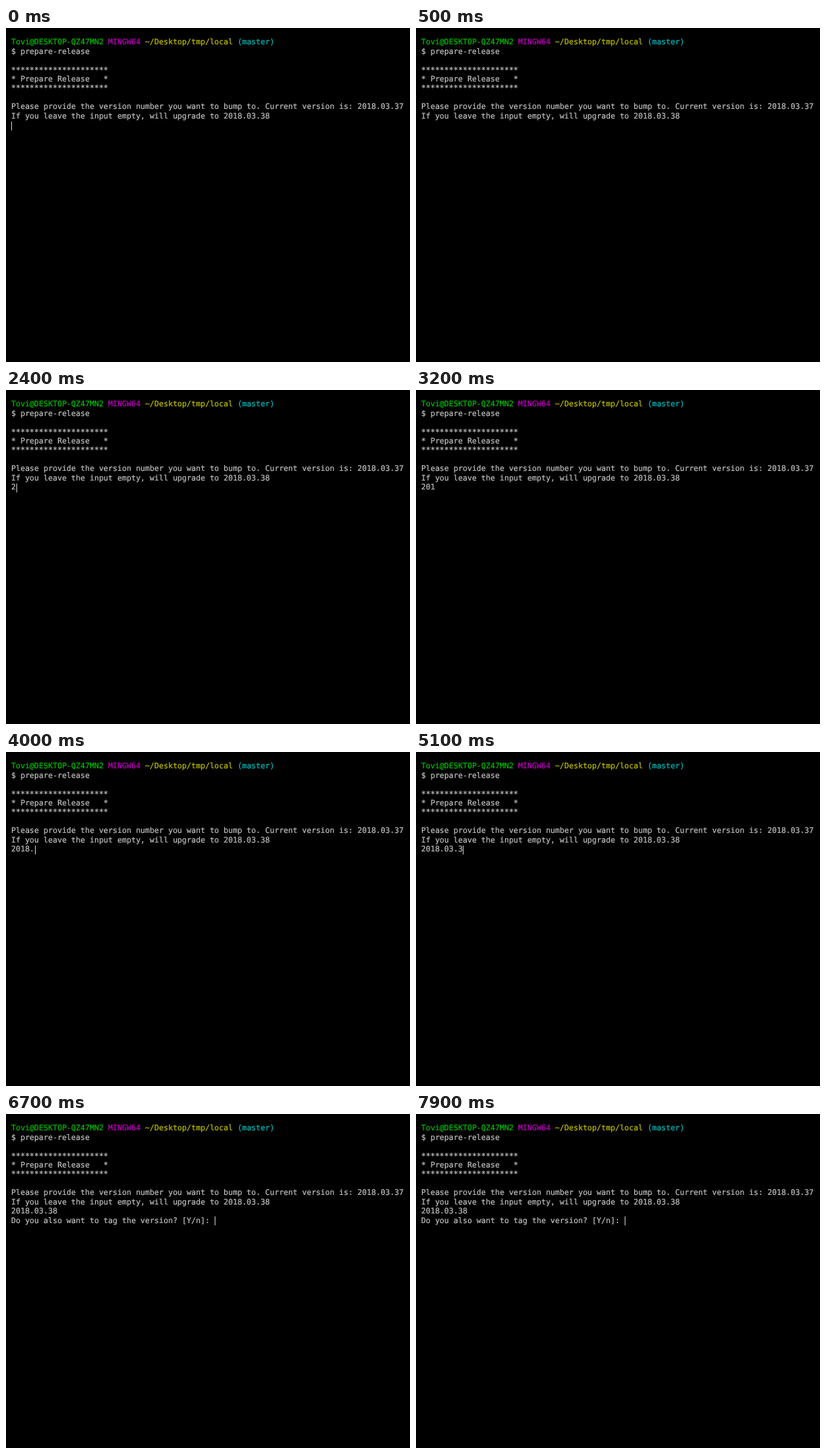
An HTML page that plays this animation: 544 by 450 pixels, repeating every 8 s.

```html
<!DOCTYPE html>
<html lang="en">
<head>
<meta charset="utf-8">
<title>Prepare Release</title>
<style>
  html, body { margin: 0; width: 100%; height: 100%; overflow: hidden; background: #000; }
  #screen {
    position: absolute; left: 7px; top: 13.2px; margin: 0;
    font: 10.33px/12.43px "DejaVu Sans Mono", monospace;
    text-rendering: geometricPrecision;
    font-variant-ligatures: none;
    -webkit-text-stroke: 0.2px;
    color: #bfbfbf;
  }
  .user { color: #00bf00; }
  .system { color: #bf00bf; }
  .path { color: #bfbf00; }
  .branch { color: #00bfbf; }
  #cursor { position: absolute; width: 1px; height: 12px; background: #bfbfbf; }
</style>
</head>
<body>
<pre id="screen"><span class="user">Tovi@DESKTOP-QZ47MN2</span> <span class="system">MINGW64</span> <span class="path">~/Desktop/tmp/local</span> <span class="branch">(master)</span>
$ prepare-release

*********************
* Prepare Release   *
*********************

Please provide the version number you want to bump to. Current version is: 2018.03.37
If you leave the input empty, will upgrade to 2018.03.38
<span id="input"></span></pre>
<div id="cursor"></div>
<script>
  const LOOP = 8000, BLINK = 500;
  const LEFT = 7.4, ADVANCE = 6.22, LINE = 12.43, INPUT_TOP = 126;
  const VERSION = "2018.03.38";
  const QUESTION = "Do you also want to tag the version? [Y/n]: ";

  // Time of each key press; the last one is Enter.
  const keys = [2200, 2500, 2700, 3300, 3700, 4400, 4600, 4800, 5100, 5800, 6700];

  const input = document.getElementById("input");
  const cursor = document.getElementById("cursor");

  function render(time) {
    const pressed = keys.filter(key => key <= time);
    const entered = pressed.length > VERSION.length;
    const typed = VERSION.slice(0, pressed.length);
    const text = entered ? typed + "\n" + QUESTION : typed;
    if (input.textContent !== text) input.textContent = text;

    // Each key press restarts the blink with the cursor visible.
    const idle = time - (pressed.at(-1) ?? 0);
    const column = entered ? QUESTION.length : typed.length;
    cursor.style.left = Math.round(LEFT + column * ADVANCE) + "px";
    cursor.style.top = Math.round(INPUT_TOP + (entered ? LINE : 0)) + "px";
    cursor.style.visibility = Math.floor(idle / BLINK) % 2 ? "hidden" : "visible";
  }

  const start = performance.now();
  function tick() {
    render((performance.now() - start) % LOOP);
    requestAnimationFrame(tick);
  }
  tick();
</script>
</body>
</html>
```
